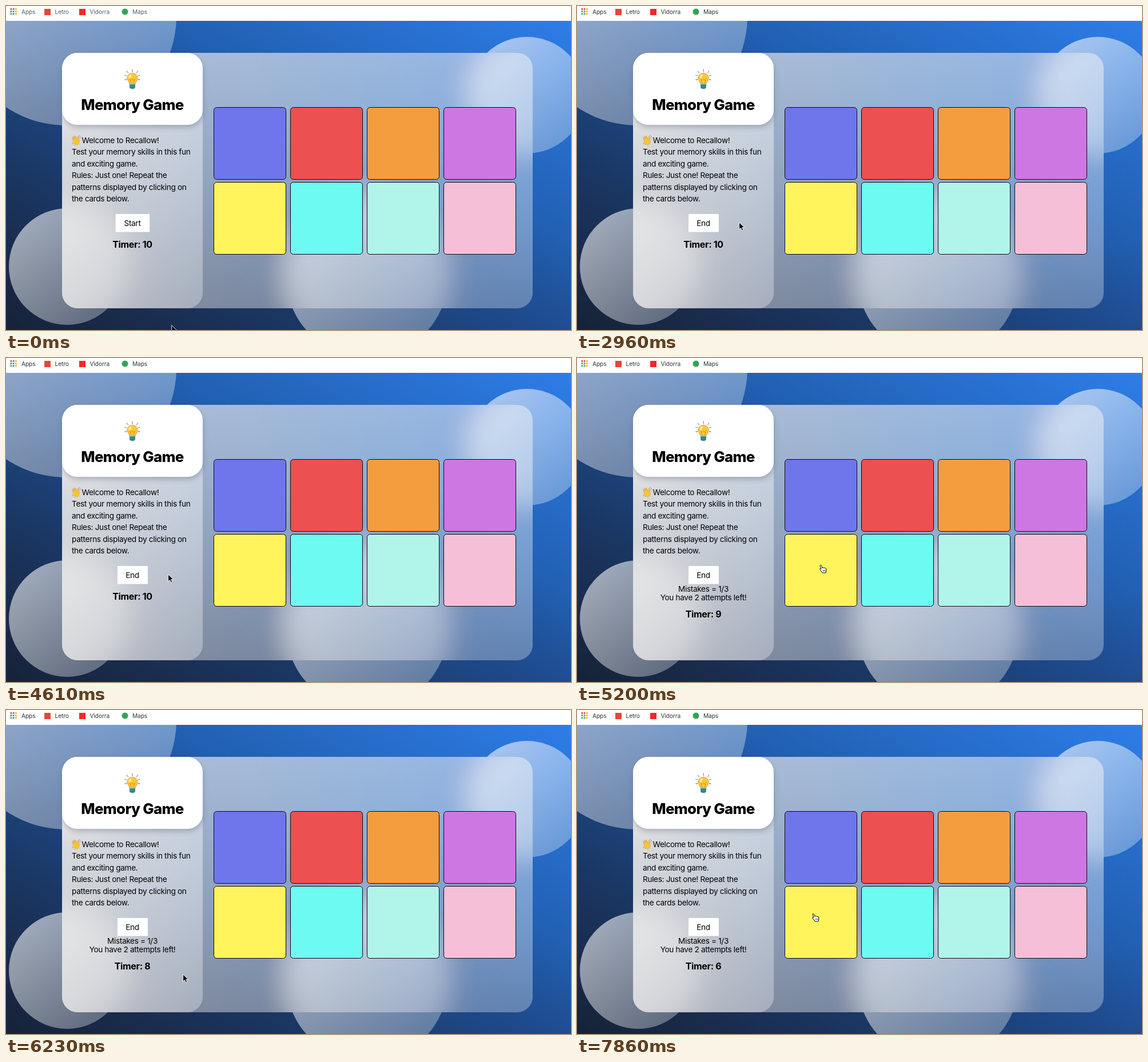
An HTML page for the animation above (8000 ms loop, 988 px wide and 567 px high).

```html
<!DOCTYPE html>
<html lang="en">
<head>
<meta charset="utf-8">
<title>Memory Game</title>
<style>
  html, body { margin: 0; width: 100%; height: 100%; overflow: hidden; background: #fff; }
  svg { display: block; width: 100vw; height: 100vh; }
  text { font: 13.6px Inter, "Open Sans", sans-serif; letter-spacing: -.024em; white-space: pre; }
  .mid { text-anchor: middle; }
  .title { font-size: 25.8px; font-weight: 800; letter-spacing: -.025em; }
  .timer { font-size: 16px; font-weight: 700; letter-spacing: -.02em; }
  #marks text { font-size: 10.2px; letter-spacing: -.01em; }
</style>
</head>
<body>
<svg id="stage" viewBox="0 0 988 567">
  <defs>
    <linearGradient id="sky" gradientUnits="userSpaceOnUse" x1="0" y1="1" x2="1" y2="0"
      gradientTransform="translate(0 26) scale(988 541)">
      <stop offset="0" stop-color="#152238"/>
      <stop offset=".14" stop-color="#1a2c4e"/>
      <stop offset=".28" stop-color="#1a3865"/>
      <stop offset=".51" stop-color="#1f4e94"/>
      <stop offset=".64" stop-color="#2160b2"/>
      <stop offset="1" stop-color="#2e7de8"/>
    </linearGradient>
    <linearGradient id="bubble" x2="1" y2="1">
      <stop offset="0" stop-color="#fff" stop-opacity=".63"/>
      <stop offset="1" stop-color="#fff" stop-opacity=".26"/>
    </linearGradient>
    <linearGradient id="glass" x2="1" y2="1">
      <stop offset="0" stop-color="#f2efea" stop-opacity=".7"/>
      <stop offset="1" stop-color="#fff" stop-opacity=".3"/>
    </linearGradient>
    <linearGradient id="ivory" x2="0" y2="1">
      <stop offset="0" stop-color="#d9d9d9"/>
      <stop offset=".3" stop-color="#fbfbfb"/>
      <stop offset="1" stop-color="#dedede"/>
    </linearGradient>
    <linearGradient id="ebony" x2="0" y2="1">
      <stop offset="0" stop-color="#0b0b0b"/>
      <stop offset=".8" stop-color="#3a3a3a"/>
      <stop offset="1" stop-color="#111"/>
    </linearGradient>
    <linearGradient id="lid" x2="0" y2="1">
      <stop offset="0" stop-color="#111"/>
      <stop offset=".5" stop-color="#333"/>
      <stop offset="1" stop-color="#050505"/>
    </linearGradient>
    <filter id="blur" filterUnits="userSpaceOnUse" x="-60" y="-40" width="1110" height="680">
      <feGaussianBlur stdDeviation="22"/>
    </filter>
    <filter id="shade" x="-20%" y="-20%" width="140%" height="150%">
      <feDropShadow dx="1" dy="5" stdDeviation="4" flood-color="#39465c" flood-opacity=".28"/>
    </filter>
    <clipPath id="panel"><rect x="98" y="82" width="823" height="447" rx="27"/></clipPath>
    <g id="scene">
      <rect x="-100" y="-60" width="1190" height="720" fill="url(#sky)"/>
      <g fill="url(#bubble)">
        <circle cx="106" cy="17" r="192"/>
        <circle cx="911" cy="156" r="102"/>
        <circle cx="107" cy="456" r="102"/>
        <circle cx="631.5" cy="473" r="142"/>
      </g>
    </g>
  </defs>

  <use href="#scene"/>
  <g clip-path="url(#panel)"><use href="#scene" filter="url(#blur)"/></g>
  <rect x="98" y="82" width="823" height="447" rx="27" fill="url(#glass)"/>
  <rect x="98" y="82" width="246" height="447" rx="27" fill="url(#glass)"/>
  <rect x="98" y="82" width="246" height="126" rx="27" fill="#fff" filter="url(#shade)"/>

  <rect width="988" height="26" fill="#fff"/>
  <g id="marks"></g>

  <g id="bulb">
    <path d="M221 111v4M211.500 114l2 3M230.500 114l-2 3M207.500 121l3 1M234.500 121l-3 1M208 129l2.500-.5M234 129l-2.500-.5"
      stroke="#8b8f96" stroke-width="1.300" stroke-linecap="round"/>
    <path d="M221 117.500c-5.600 0-9.300 4-9.300 8.700 0 5 4 6.300 4.500 10.800h9.600c.5-4.500 4.500-5.800 4.500-10.800 0-4.700-3.700-8.700-9.300-8.700z"
      fill="#fcc63d" stroke="#d79a2b" stroke-width=".8"/>
    <path d="M218.500 136l-1.500-8 2.500 1.500 1.500-1.500 1.500 1.500 2.500-1.500-1.500 8" fill="none" stroke="#c98418" stroke-width=".8"/>
    <ellipse cx="217" cy="123" rx="2" ry="3.500" fill="#fff0a8" transform="rotate(25 217 123)"/>
    <path d="M216 137h10v5q-1 3.500-5 3.500t-5-3.500z" fill="#3f9aa0"/>
    <path d="M216 139.500h10M216.500 142.500h9" stroke="#24666d"/>
  </g>
  <text class="mid title" x="221" y="182">Memory Game</text>

  <g id="wave" fill="#f9c338" stroke="#d89a25" stroke-width=".6">
    <path d="M117 234.500l-1.300-3c-.4-1.200 1.200-1.800 1.800-.7l1.500 2.400-1.700-4c-.4-1.200 1.300-1.800 1.900-.6l2 3.800-1.300-3.900c-.3-1.200 1.300-1.700 1.900-.6l3.200 6 .2-3.100c.2-1.500 2-1.400 2.100 0l.8 5.800c.4 3.500-2 6.400-5 6.400-2.600 0-4-1.500-5-3.500z"/>
    <path d="M125 228q3 .5 4 3.500M126.500 226.500q4 .5 5 4.500M115.500 239q.5 2.500 3 3.500" fill="none" stroke="#6d86a8"/>
  </g>
  <g id="intro"></g>

  <rect id="button" y="364" height="31.500" fill="#fff"/>
  <text id="label" class="mid" x="221" y="384.500"></text>
  <g id="misses">
    <text class="mid" x="221" y="408.500">Mistakes = 1/3</text>
    <text class="mid" x="221" y="424">You have 2 attempts left!</text>
  </g>
  <text id="timer" class="mid timer" x="221"></text>

  <g id="cards" stroke="#0a0a14"></g>
  <g id="piano"></g>

  <path id="arrow" d="M.6.800v12.400l2.900-2.700 2 4.500 2.200-1-2-4.400h4z" fill="#000" stroke="#fff" stroke-width=".9"/>
  <g id="hand" stroke="#000" stroke-width="1" stroke-linejoin="round">
    <path d="M1 1.600C1 .3 3 0 3.500 1.300L5 5.400c.3-1.200 2-1.200 2.300.1.500-1 2-.8 2.200.4.700-.7 1.900-.2 2 .8l.3 3c.1 1.800-.7 2.500-.8 4.300H5.300c-.5-1.700-2-2.400-3.100-4L.7 7.800c-.6-1.200.9-2 1.800-1.100l.6.700z" fill="#fff"/>
    <path d="M6.300 9v2.500M8.200 9v2.500M10 9v2.500" stroke-width=".7"/>
  </g>
</svg>

<script>
const LOOP = 8000;
const $ = id => document.getElementById(id);
const rect = (x, y, w, h, fill, more = '') =>
  `<rect x="${x}" y="${y}" width="${w}" height="${h}" fill="${fill}" ${more}/>`;

const dots = ['#e8453c', '#e8453c', '#f5b400', '#34a853', '#4285f4', '#f5b400', '#34a853', '#34a853', '#f5b400'];
$('marks').innerHTML =
  dots.map((c, i) => rect(7.500 + i % 3 * 4.200, 4 + Math.floor(i / 3) * 4.200, 2.800, 2.800, c)).join('') +
  rect(67, 5, 11, 11, '#e5453b') + rect(128, 5, 11, 11, '#f02b25') +
  '<circle cx="208" cy="10" r="5.500" fill="#34a456"/>' +
  [[27, 'Apps'], [85.5, 'Letro'], [146.5, 'Vidorra'], [221, 'Maps']]
    .map(([x, s]) => `<text x="${x}" y="13.500">${s}</text>`).join('');

$('intro').innerHTML = [
  'Welcome to Recallow!',
  'Test your memory skills in this fun',
  'and exciting game.',
  'Rules: Just one! Repeat the',
  'patterns displayed by clicking on',
  'the cards below.'
].map((s, i) => `<text x="${i ? 115 : 132.5}" y="${240 + i * 20.4}">${s}</text>`).join('');

const colors = ['#6f76eb', '#ed5050', '#f49d3e', '#cd77e2', '#fff45c', '#6dfaf2', '#b1f5ea', '#f4bfd7'];
$('cards').innerHTML = colors.map((c, i) =>
  rect(363.5 + i % 4 * 134, i < 4 ? 177.5 : 308.5, 126, 126, c, 'rx="5"')).join('');

$('piano').innerHTML =
  rect(368.5, 184, 114, 114, '#333', 'rx="6"') +
  rect(368.5, 184, 114, 19.5, 'url(#lid)', 'rx="5"') +
  [0, 1, 2, 3].map(i => rect(370.5 + i * 27.6, 203, 26.800, 93, 'url(#ivory)', 'rx="2"')).join('') +
  [0, 1, 2].map(i => rect(387.5 + i * 29.7, 203, 15, 57, '#050505', 'rx="2"') +
    rect(390.5 + i * 29.7, 203, 9, 50, 'url(#ebony)', 'rx="1.500"')).join('');

// time, x, y, shape
const moves = [
  [0, 289, 558, 'arrow'], [150, 0, 0, ''],
  [440, 289, 552, 'arrow'], [590, 297, 520, 'arrow'], [740, 306, 475, 'arrow'], [890, 310, 446, 'arrow'],
  [1930, 310, 421, 'arrow'], [2080, 280, 398, 'arrow'], [2225, 226, 379, 'hand'],
  [2520, 230, 378, 'hand'], [2665, 256, 375, 'arrow'], [2815, 277, 377, 'arrow'], [2960, 283, 378, 'arrow'],
  [4760, 312, 385, 'arrow'], [4905, 364, 376, 'hand'], [5050, 412, 366, 'hand'], [5200, 424, 362, 'hand'],
  [5640, 409, 374, 'hand'], [5790, 370, 402, 'hand'], [5940, 336, 436, 'arrow'],
  [6085, 315, 456, 'arrow'], [6230, 309, 462, 'arrow'],
  [7420, 330, 444, 'arrow'], [7570, 372, 402, 'hand'], [7715, 402, 370, 'hand'], [7860, 411, 356, 'hand']
];
const ticks = [[0, 10], [4760, 9], [5790, 8], [6670, 7], [7570, 6]];
const shows = [[0, 0], [3710, .5], [3860, 1], [4610, 0], [6530, .5], [6670, 1], [7420, 0]];
const at = (steps, t) => steps.findLast(s => s[0] <= t);

function draw(t) {
  $('marks').setAttribute('fill', t < 1490 ? '#545d70' : '#303236');

  const started = t >= 2370, missed = t >= 5200;
  const width = started ? 53 : 59.5;
  $('button').setAttribute('x', 221.4 - width / 2);
  $('button').setAttribute('width', width);
  $('label').textContent = started ? 'End' : 'Start';
  $('misses').style.display = missed ? '' : 'none';
  $('timer').textContent = 'Timer: ' + at(ticks, t)[1];
  $('timer').setAttribute('y', missed ? 453.5 : 423);

  const shown = at(shows, t)[1];
  $('piano').style.opacity = shown;
  $('cards').firstChild.setAttribute('fill-opacity', 1 - shown);

  const [, x, y, shape] = at(moves, t);
  for (const id of ['arrow', 'hand']) {
    $(id).style.display = id === shape ? '' : 'none';
    $(id).setAttribute('transform', `translate(${x} ${y})`);
  }
}

const start = performance.now();
function loop() {
  draw((performance.now() - start) % LOOP);
  requestAnimationFrame(loop);
}
loop();
</script>
</body>
</html>
```
